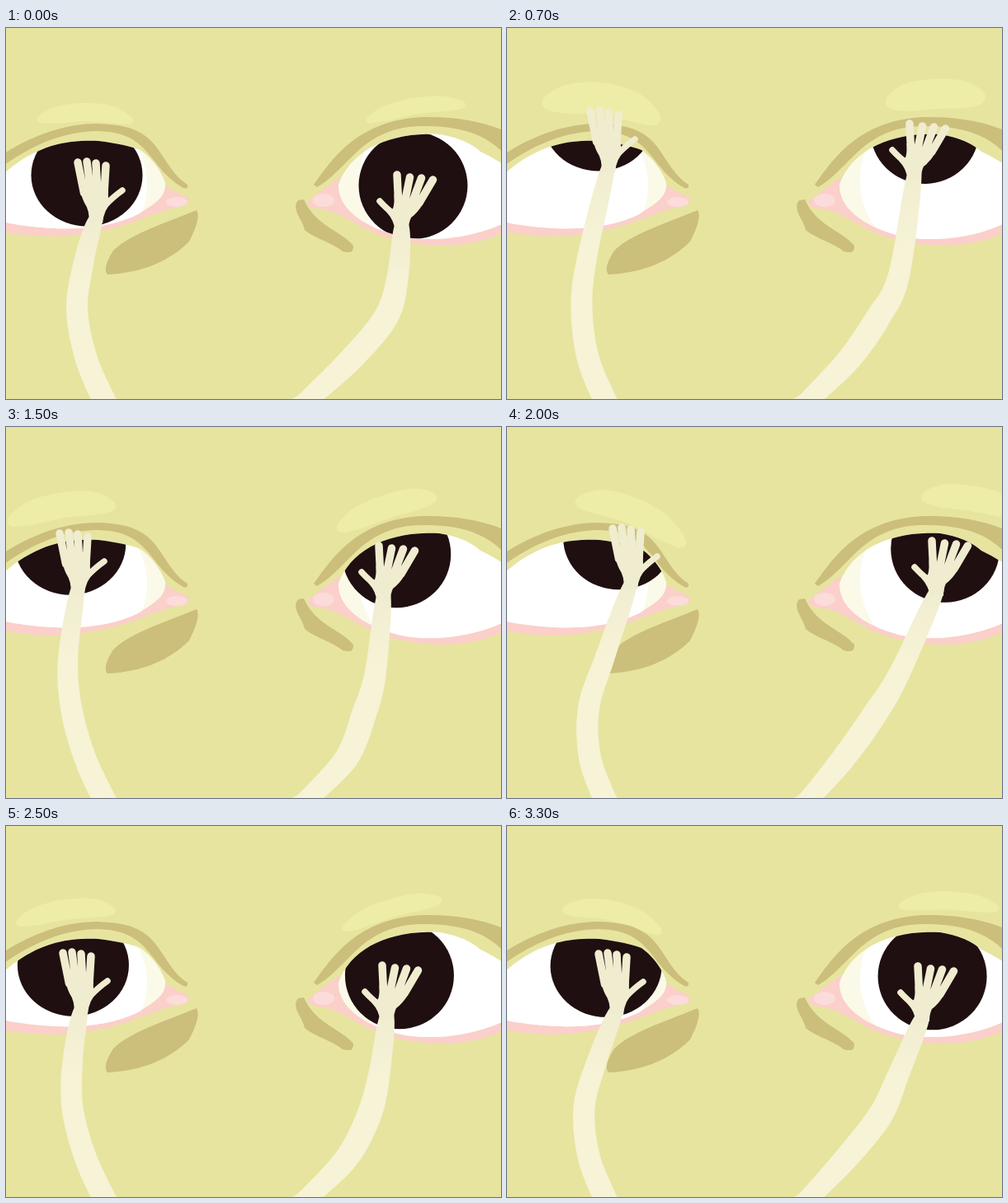
An HTML page for the animation above (3.5 s loop, 600 by 450 pixels).

```html
<!DOCTYPE html>
<html lang="en">
<head>
<meta charset="utf-8">
<title>Hands in the eyes</title>
<style>
  html, body { margin: 0; width: 100%; height: 100%; overflow: hidden; background: #e7e4a0; }
  svg { display: block; width: 100vw; height: 100vh; }
</style>
</head>
<body>
<svg viewBox="0 0 600 450" preserveAspectRatio="none">
  <defs>
    <path id="eyeL" d="M-5 179C40 138 80 136 112 137Q145 141 163 148C180 160 190 178 193 188C194 205 182 212 160 226C120 246 60 248 -5 235Z"/>
    <path id="eyeR" d="M403 190C418 148 465 126 525 129Q557 134 575 150Q590 157 605 167V236C560 258 510 258 485 254C440 245 402 222 403 190Z"/>
    <clipPath id="clipL"><use href="#eyeL"/></clipPath>
    <clipPath id="clipR"><use href="#eyeR"/></clipPath>
    <linearGradient id="skin" x1="0" y1="0" x2="0" y2="1">
      <stop offset="0" stop-color="#f0ecd0"/>
      <stop offset=".35" stop-color="#f6f3d6"/>
    </linearGradient>
  </defs>
  <rect width="600" height="450" fill="#e7e4a0"/>
  <g fill="#ededa7">
    <path id="glowL"/>
    <path id="glowR"/>
  </g>

  <!-- lid creases and bags -->
  <g fill="#cbbf7b">
    <path d="M-5 154C35 128 75 116 110 116C165 117 177 135 193 160C202 174 210 184 220 190Q221 196 215 194C170 168 177 126 110 125C70 126 35 140 -5 168Z"/>
    <path d="M373 190C395 160 425 112 505 108C545 107 580 114 605 125V154C575 120 530 119 500 119C430 122 415 172 377 193Z"/>
    <path d="M231 221Q237 230 222 259C198 283 165 297 123 299Q116 292 130 270C150 250 190 238 231 221Z"/>
    <path d="M354 209L361 208C375 240 405 245 421 264Q422 275 408 271C395 260 375 256 362 245C360 233 345 220 354 209Z"/>
  </g>

  <!-- pink rims and tear ducts -->
  <g fill="#fbcfca">
    <path d="M-5 215L185 185Q198 196 220 205Q224 211 218 215C185 220 155 238 120 245C75 255 40 255 -5 247Z"/>
    <path d="M364 212Q378 200 403 182L605 225V247C560 270 500 268 450 250C425 240 405 222 378 219Q366 217 364 212Z"/>
  </g>
  <g fill="#fbdcdb">
    <ellipse cx="207" cy="211" rx="13" ry="6"/>
    <ellipse cx="385" cy="209" rx="13" ry="8"/>
  </g>

  <use href="#eyeL" fill="#fbfae9"/>
  <use href="#eyeR" fill="#fbfae9"/>
  <g clip-path="url(#clipL)">
    <ellipse cx="80" cy="190" rx="91" ry="90" fill="#fff"/>
    <ellipse id="irisL" rx="67.5" ry="62" fill="#1f0f10"/>
  </g>
  <g clip-path="url(#clipR)">
    <ellipse cx="522" cy="185" rx="94" ry="96" fill="#fff"/>
    <ellipse id="irisR" rx="66" ry="65" fill="#1f0f10"/>
  </g>

  <path id="armL" fill="url(#skin)"/>
  <path id="armR" fill="url(#skin)"/>
  <g fill="#f0ecd0" stroke="#f0ecd0" stroke-width="9.500" stroke-linecap="round">
    <g id="handL">
      <path d="M87 163L94.500 200M98 162L103 200M109 164L111 200M121 167L119 200"/>
      <path stroke-width="7.500" d="M141 197Q131 204 120 215"/>
      <path stroke="none" d="M90 194H123.500L124 206L131 207Q118 221 117 237H100.500Q102 222 95 212Q91 204 90 194Z"/>
    </g>
    <g id="handR">
      <path d="M474 178L475.500 208M489.500 181L484 208M503.500 182L493 210M517.500 184L501 212"/>
      <path stroke-width="7.500" d="M453 210Q461 219 473 228"/>
      <path stroke="none" d="M470.500 202L505 214Q499 224 491 230Q488 236 488 245H471Q471 234 461 223L469 219Q471 214 470.500 202Z"/>
    </g>
  </g>
</svg>
<script>
const $ = id => document.getElementById(id);
const set = (id, attrs) => { for (const k in attrs) $(id).setAttribute(k, attrs[k]); };

// Where the hands stand on their way round the eye
const stops = [[0, 0], [-18, -9], [-22, -34], [-9, -43], [14, -62], [41, -40], [24, -8]];

// Catmull-Rom curve through closed points
function smooth(p) {
  const n = p.length, at = i => p[(i + n) % n];
  let d = `M${p[0]}`;
  for (let i = 0; i < n; i++) {
    const [a, b, c, e] = [at(i - 1), at(i), at(i + 1), at(i + 2)];
    const out = b.map((v, k) => v + (c[k] - a[k]) / 6);
    const back = c.map((v, k) => v - (e[k] - b[k]) / 6);
    d += `C${out} ${back} ${c}`;
  }
  return d + "Z";
}

// Band around a spine, with a half width per point
function ribbon(p, w) {
  const left = [], right = [];
  p.forEach(([x, y], i) => {
    const a = p[Math.max(i - 1, 0)], b = p[Math.min(i + 1, p.length - 1)];
    const dx = b[0] - a[0], dy = b[1] - a[1], k = w[i] / Math.hypot(dx, dy);
    left.push([x - dy * k, y + dx * k]);
    right.unshift([x + dy * k, y - dx * k]);
  });
  return smooth([...left, ...right]);
}

// Light patch that lies along the arch of the lid
function glow(mid, half, arch, thick) {
  const p = [], w = [];
  for (let i = 0; i <= 6; i++) {
    const s = i / 3 - 1, x = mid + half * s;
    p.push([x, arch(x)]);
    w.push(thick * (1 - .65 * s ** 4));
  }
  return ribbon(p, w);
}

function draw([hx, hy]) {
  const left = Math.min(hx, 0), right = Math.max(hx, 0);
  const ix = 1 + hx * .92, iy = hy * 1.08;
  set("irisL", { cx: 97 + ix, cy: 178.5 + iy });
  set("irisR", { cx: 492.5 + ix, cy: 191 + iy });

  for (const id of ["handL", "handR"]) set(id, { transform: `translate(${hx} ${hy})` });

  // The elbows follow the hands less and less towards the root
  set("armL", { d: ribbon([
    [108.5 + hx, 231 + hy],
    [95 + hx * .7 + hy * .13, 280],
    [86 + hx * .32, 340],
    [97 + hx * .08, 400],
    [118, 450], [124, 463]
  ], [8, 12, 13, 13.5, 14, 14]) });
  set("armR", { d: ribbon([
    [480 + hx, 239 + hy],
    [475 + left * 1.25, 300],
    [461 + left * 1.1 - right * .3 + hy * .1, 350],
    [418 - Math.abs(hx) * .25, 402],
    [367, 450], [354, 462]
  ], [8.5, 13, 15, 14.5, 12, 12]) });

  const archL = x => 102 + hy * .28 + (x - 100) ** 2 * (x < 100 ? .0025 : .004);
  const archR = x => 92 + hy * .2 + (x - 530) ** 2 * .0024;
  set("glowL", { d: glow(96 + hx * 1.3, 56 - hy * .2, archL, 11 - hy * .13) });
  set("glowR", { d: glow(497 + hx * 1.6, 58, archR, 10 - hy * .13) });
}

// Each half second holds three drawings: 200, 100 and 200 ms
let shown = -1;
function tick() {
  const t = performance.now() % 3500, u = t % 500;
  const step = Math.floor(t / 500) * 3 + (u >= 200) + (u >= 300);
  const i = step % stops.length;
  if (i !== shown) draw(stops[shown = i]);
  requestAnimationFrame(tick);
}
tick();
</script>
</body>
</html>
```
